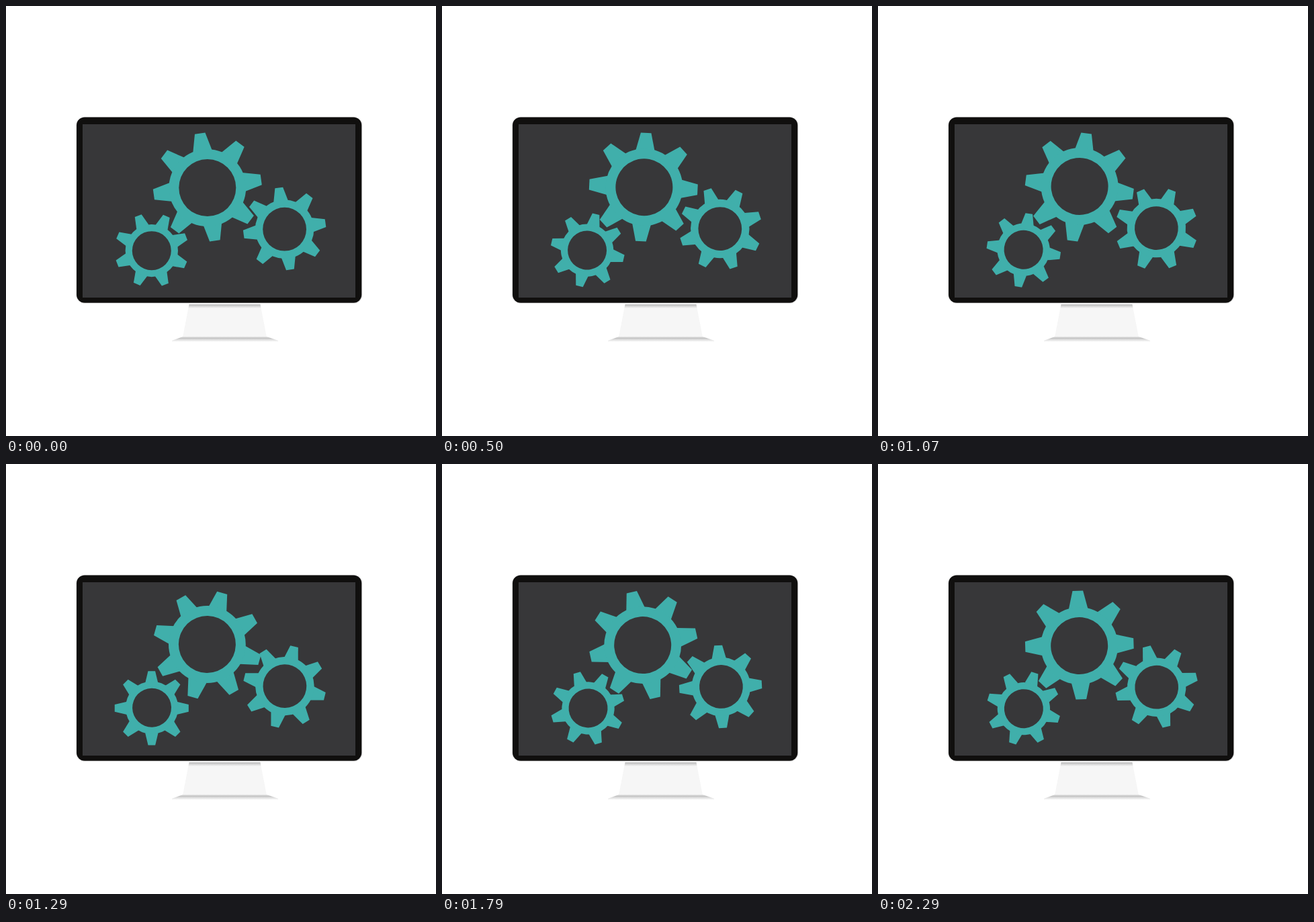
An HTML page for the animation above (2370 ms loop, 640 px wide and 640 px high).

```html
<!DOCTYPE html>
<html>
<head>
<meta charset="utf-8">
<style>
  html, body { margin: 0; width: 100%; height: 100%; overflow: hidden; background: #fff; }
  svg { display: block; width: 100vw; height: 100vh; }
</style>
</head>
<body>
<svg viewBox="0 0 640 640">
  <defs>
    <linearGradient id="neck" x2="0" y2="1">
      <stop offset="0" stop-color="#b9b9b9"/>
      <stop offset=".12" stop-color="#f6f6f6"/>
    </linearGradient>
    <linearGradient id="foot" x2="0" y2="1">
      <stop offset="0" stop-color="#f0f0f0"/>
      <stop offset=".3" stop-color="#c2c2c2"/>
      <stop offset=".65" stop-color="#e2e2e2"/>
      <stop offset="1" stop-color="#f8f8f8"/>
    </linearGradient>
  </defs>

  <path d="M272.5 444H378.5L388 493H263Z" fill="url(#neck)"/>
  <path d="M263 492H388L405 498V499.5H247V498Z" fill="url(#foot)"/>
  <rect x="104.6" y="165.4" width="425.6" height="277.2" rx="12.5" fill="#d8d8d8"/>
  <rect x="105" y="165.5" width="424.3" height="276.2" rx="12" fill="#100f0e"/>
  <rect x="114" y="176" width="406" height="258" fill="#373739"/>
  <g id="gears" fill="#40afab"></g>
</svg>

<script>
const FPS = 14, SOURCE_FPS = 25, STEPS = 59, LOOP = 2370;

// dir: 1 turns clockwise, -1 counterclockwise
const gears = [
  { x: 299.8, y: 269.5, size: 1, start: -7.9, dir: -1 },
  { x: 414.6, y: 331.4, size: 0.762, start: -7.8, dir: 1 },
  { x: 216.8, y: 363.4, size: 0.682, start: 23.6, dir: 1 }
];

const teeth = Array.from({ length: 8 }, (_, i) =>
  `<path d="M-14.2 -54L-7.8 -80.7H7.8L14.2 -54Z" transform="rotate(${i * 45})"/>`).join('');

// The ring sits slightly off the turning point, so it wobbles.
const group = document.getElementById('gears');
group.innerHTML = gears.map(g =>
  `<g>${teeth}<g transform="rotate(${-g.start}) translate(0 1.1)">
    <circle r="57.4"/><circle r="42.5" fill="#373739"/></g></g>`).join('');

function draw(now) {
  const t = Math.floor(now % LOOP / 10) * 10;
  const frame = Math.min(32, Math.floor((t + 5) * FPS / 1000));
  const turn = Math.ceil(frame * SOURCE_FPS / FPS) * 360 / STEPS;
  gears.forEach((g, i) => group.children[i].setAttribute('transform',
    `translate(${g.x} ${g.y}) rotate(${g.start + g.dir * turn}) scale(${g.size})`));
}

let begin;
function tick(now) {
  begin ??= now;
  draw(now - begin);
  requestAnimationFrame(tick);
}
draw(0);
requestAnimationFrame(tick);
</script>
</body>
</html>
```
